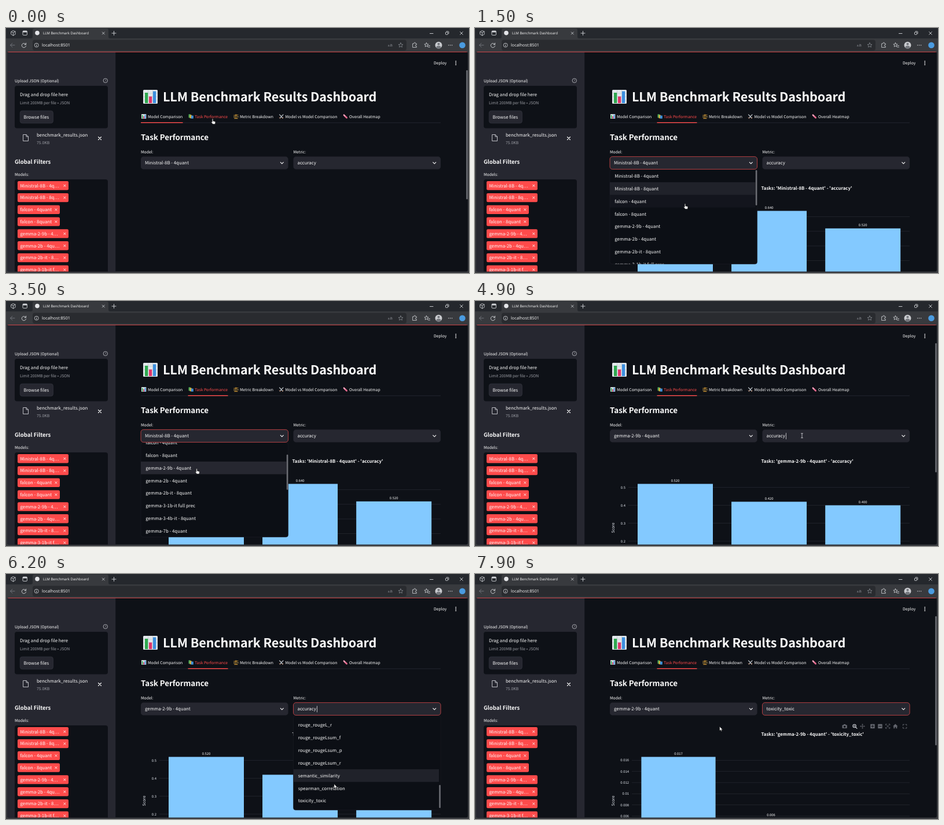
An HTML page for the animation above (8 s loop, 800x424 px).

```html
<!DOCTYPE html>
<html lang="en">
<head>
<meta charset="utf-8">
<title>LLM Benchmark Dashboard</title>
<style>
html, body { margin: 0; width: 100%; height: 100%; overflow: hidden; background: #25282d; }
svg { display: block; width: 100vw; height: 100vh; }
text { font-family: "Noto Sans CJK JP", "Noto Sans CJK SC", "Noto Sans CJK KR", "Noto Sans", sans-serif; white-space: pre; text-rendering: geometricPrecision; }
text.ui { font-family: "Open Sans", "Noto Sans", sans-serif; }
</style>
</head>
<body>
<svg id="stage" viewBox="0 0 800 424" xmlns="http://www.w3.org/2000/svg"></svg>
<script>
const LOOP = 8000, ZOOM = 0.547, ROW = 21.88, LIST_TOP = 245, LIST_H = 163.5;
const RED = '#ff4b4b', INK = '#fafafa', PANEL = '#262730', PAGE = '#0e1117', DIM = '#9a9ca3';

// --- markup helpers -------------------------------------------------------
const rect = (x, y, w, h, fill, r = 0, more = '') =>
  `<rect x="${x}" y="${y}" width="${w}" height="${h}" rx="${r}" fill="${fill}" ${more}/>`;
const line = (d, color = INK, w = 0.9, more = '') =>
  `<path d="${d}" fill="none" stroke="${color}" stroke-width="${w}" stroke-linecap="round" stroke-linejoin="round" ${more}/>`;
const shape = (d, fill, more = '') => `<path d="${d}" fill="${fill}" ${more}/>`;
const dot = (x, y, r, fill) => `<circle cx="${x}" cy="${y}" r="${r}" fill="${fill}"/>`;
const ring = (x, y, r, color, w) => `<circle cx="${x}" cy="${y}" r="${r}" fill="none" stroke="${color}" stroke-width="${w}"/>`;
const group = (id, body, more = '') => `<g id="${id}" ${more}>${body}</g>`;
const cross = (x, y, r, color = INK, w = 0.9) =>
  line(`M${x - r} ${y - r}L${x + r} ${y + r}M${x + r} ${y - r}L${x - r} ${y + r}`, color, w);
const clip = (id, x, y, w, h, r = 0) => `<clipPath id="${id}">${rect(x, y, w, h, '#000', r)}</clipPath>`;

// text centred on its cap height; px is the page size before zoom
const text = (x, cy, str, px = 16, fill = INK, more = '') =>
  `<text x="${x}" y="${(cy + px * ZOOM * 0.33).toFixed(2)}" font-size="${(px * ZOOM / 1.117).toFixed(2)}" fill="${fill}" ${more}>${str}</text>`;
const uiText = (x, y, str, size, fill = INK) =>
  `<text class="ui" x="${x}" y="${y}" font-size="${size}" fill="${fill}">${str}</text>`;
const BOLD = 'font-weight="700"';

// --- browser frame --------------------------------------------------------
function browser() {
  const soft = '#d4d6da', faint = '#85888e';
  return rect(0, 0, 800, 424, '#25282d') +
    rect(0, 18, 800, 406, '#383a3e') +
    shape('M43 18Q46 18 46 15V4Q46 1 49 1H174Q177 1 177 4V15Q177 18 180 18Z', '#383a3e') +
    line('M9 6.5L12 4.5L16 6V11L12.5 13L9 11ZM9 6.5L12.5 8.2L16 6M12.5 8.2V13', soft, 0.8) +
    rect(29, 5, 7.4, 7.4, 'none', 1.2, `stroke="${soft}" stroke-width=".9"`) +
    rect(29, 5, 7.4, 2.6, soft, 1) +
    dot(54, 8.6, 3.8, '#e4e5e8') +
    uiText(64, 11, 'LLM Benchmark Dashboard', 6.1) +
    cross(168.3, 9, 2, soft, 0.8) +
    line('M183 9H190M186.500 5.500V12.500', soft, 0.9) +
    line('M732.500 9.500H738', soft, 0.9) +
    rect(759.5, 7.3, 4, 4, 'none', 0.7, `stroke="${soft}" stroke-width=".9"`) +
    line('M761 5.800H764.200Q765 5.800 765 6.600V9.800', soft, 0.8) +
    cross(787, 9, 2.4, soft, 0.9) +
    line('M15 29.700H7.500M11 26.200L7.500 29.700L11 33.200', '#777a80', 0.9) +
    line('M34.300 28.500A3.700 3.700 0 1 0 34.600 31M34.600 26V28.700H31.900', soft, 0.9) +
    rect(46, 20.5, 646, 18.5, '#292b2f', 4) +
    ring(52.7, 29.7, 3.5, soft, 0.8) + line('M52.700 29.500V31.600M52.700 27.700V27.800', soft, 0.9) +
    uiText(62, 32.3, 'localhost:8501', 7.27) +
    `<text x="659.5" y="32" font-size="5.6" fill="${faint}">aあ</text>` +
    line(star(682, 29.8, 4.2), faint, 0.8) +
    line('M703 27H705Q705 25 706.300 25Q707.600 25 707.600 27H709.300V29Q707.300 29 707.300 30.300Q707.300 31.600 709.300 31.600V33.500H703Z', soft, 0.8) +
    line(star(726.5, 29.3, 3.8), soft, 0.8) + line('M730 30.500H732.500M729.500 33H732.500', soft, 0.8) +
    dot(747.5, 29.7, 6, '#c9cbcf') + dot(747.5, 27.8, 2, '#73767c') +
    shape('M743.300 33.700Q743.500 30.800 747.500 30.800Q751.500 30.800 751.700 33.700Q750 35.700 747.500 35.700Q745 35.700 743.300 33.700Z', '#73767c') +
    [764.8, 767.7, 770.6].map(x => dot(x, 29.7, 0.75, soft)).join('') +
    dot(788.5, 29.7, 5.3, '#4a9be0');
}

function star(cx, cy, r) {
  let d = '';
  for (let i = 0; i < 10; i++) {
    const a = -Math.PI / 2 + i * Math.PI / 5, q = i % 2 ? r * 0.46 : r;
    d += (i ? 'L' : 'M') + (cx + q * Math.cos(a)).toFixed(2) + ' ' + (cy + q * Math.sin(a)).toFixed(2);
  }
  return d + 'Z';
}

// --- sidebar --------------------------------------------------------------
function sidebar() {
  const tags = ['Ministral-8B - 4q…', 'Ministral-8B - 8q…', 'falcon - 4quant', 'falcon - 8quant',
    'gemma-2-9b - 4…', 'gemma-2b - 4qu…', 'gemma-2b-it - 8…', 'gemma-3-1b-it f…'];
  return rect(2, 41, 187.3, 383, PANEL) +
    text(15, 91, 'Upload JSON (Optional)', 14) +
    ring(171.8, 91, 3.7, '#c3c4c9', 0.8) + text(171.8, 91, '?', 10, '#d5d6da', 'text-anchor="middle"') +
    rect(15, 100, 161, 73.5, PAGE, 4) +
    text(24, 115.5, 'Drag and drop file here') +
    text(24, 129, 'Limit 200MB per file • JSON', 14, DIM) +
    rect(24.2, 143.2, 57.3, 21.6, PANEL, 4, 'stroke="#3d3f49" stroke-width=".5"') +
    text(30.5, 154, 'Browse files') +
    line('M30 184.500H35L38.500 188V195.500H30ZM35 184.500V188H38.500', '#d0d1d6', 0.9) +
    text(53, 185.5, 'benchmark_results.json') +
    text(53, 198, '75.0KB', 14, DIM) +
    cross(162, 191, 2.5, INK, 1.1) +
    text(15, 231.3, 'Global Filters', 19.5, INK, BOLD) +
    text(15, 253, 'Models:', 14) +
    rect(15, 262, 161, 180, PAGE, 4) +
    tags.map((s, i) => {
      const y = 272.8 + i * 20.8, w = s.startsWith('falcon') ? 73 : 88;
      return rect(20, y - 7.7, w, 15.3, RED, 2.2) + text(24.5, y, s) + cross(20 + w - 6.6, y, 1.6, INK, 0.9);
    }).join('');
}

// --- main area ------------------------------------------------------------
const chartIcon = (x, y, k) => `<g transform="translate(${x} ${y}) scale(${k})">` +
  rect(0, 0, 25, 24, '#e3e8ec', 1.5) +
  line('M1 6H24M1 12H24M1 18H24M8.500 1V23M16.500 1V23', '#b9c4cc', 0.7) +
  rect(3, 5, 5.2, 18, '#2fa84f') + rect(10, 11.5, 5.2, 11.5, '#e0356b') + rect(17, 2.5, 5.2, 20.5, '#3c8fe0') + '</g>';

function tabIcons() {
  return chartIcon(234, 149, 0.33) +
    rect(315.5, 149.3, 3.6, 6, '#4aa657', 0.5) + rect(317.6, 150.6, 3.4, 5.6, '#e2b23c', 0.5) +
    rect(319.8, 151.6, 4, 5.2, '#3d8fd8', 0.5) +
    line('M397.300 149.500V156M394.500 156.600H400.200M393.800 151.200L400.900 150.700', '#e0a43a', 1) +
    shape('M392.800 153.600H396.300Q394.500 156 392.800 153.600ZM398.700 153.200H402.200Q400.500 155.600 398.700 153.200Z', '#e8bb58') +
    line('M472.500 149.800L478.500 156M479 149.800L473 156', '#cfd6dc', 1.1) +
    line('M472.200 154.500L474.300 156.800M479.300 154.500L477.200 156.800', '#a4633e', 0.9) +
    line('M584 150.800L588.600 155.300', '#e7698e', 2.8) + line('M583.600 150.300L585.500 152.200', '#f3c0cf', 1.3);
}

function mainArea() {
  const tabs = [[245, 'Model Comparison'], [404, 'Metric Breakdown'], [482.5, 'Model vs Model Comparison'], [593, 'Overall Heatmap']];
  return text(739, 60.5, 'Deploy', 14) +
    [57.6, 60.5, 63.4].map(y => dot(777.3, y, 0.95, INK)).join('') +
    chartIcon(237, 107, 1) +
    text(271, 119, 'LLM Benchmark Results Dashboard', 44, INK, BOLD + ' letter-spacing="-.12"') +
    tabIcons() +
    tabs.map(([x, s]) => text(x, 153, s, 14)).join('') +
    text(326, 153, 'Task Performance', 14, RED, 'id="taskTab"') +
    rect(233, 163.6, 518, 0.7, '#2c2f38') +
    rect(233, 163, 72.5, 1.4, RED, 0, 'id="bar"') +
    text(233, 189.5, 'Task Performance', 27.4, INK, BOLD + ' letter-spacing="-.08"') +
    text(233, 214, 'Model:', 14) + text(496.5, 214, 'Metric:', 14);
}

const select = (id, x) => rect(x, 222.6, 254.6, 21.8, PANEL, 4.4, `id="${id}Box" stroke-width=".8"`) +
  text(x + 7, 233.5, '', 16, INK, `id="${id}Val"`) +
  line(`M${x + 241.3} 232.300L${x + 243.800} 234.800L${x + 246.300} 232.300`, INK, 1.1) +
  rect(0, 228.3, 0.7, 11, INK, 0, `id="${id}Caret"`);

// --- charts ---------------------------------------------------------------
function chart(id, c) {
  const yOf = v => 316.5 + (c.values[c.peak] - v) * c.k;
  let s = text(494.5, 277.5, `Tasks: '${c.model}' - '${c.metric}'`, 16, INK, BOLD);
  for (const v of c.ticks) {
    const y = yOf(v);
    s += rect(c.left, y - 0.3, 751 - c.left, 0.6, '#2b2e37') + text(c.left - 5, y, v, 12, '#e6eaf1', 'text-anchor="end"');
  }
  c.values.forEach((v, i) => {
    const x = c.x + i * c.step, y = yOf(v);
    s += rect(x, y, c.w, 500 - y, '#83c9ff') +
      text(x + c.w / 2, y - 6, v.toFixed(3), 12, INK, 'text-anchor="middle"');
  });
  s += `<g transform="translate(238.500 392.500) rotate(-90)">${text(0, 0, 'Score', 14, '#e6eaf1', 'text-anchor="middle"')}</g>`;
  return group(id, s);
}

const wide = { x: 281, step: 162.1, w: 130, left: 265, metric: 'accuracy', peak: 0 };
const charts = {
  chartA: { ...wide, model: 'Ministral-8B - 4quant', values: [0.44, 0.64, 0.52], peak: 1, k: 252.5, ticks: [0.6, 0.5, 0.4, 0.3] },
  chartB: { ...wide, model: 'gemma-2-9b - 4quant', values: [0.52, 0.42, 0.4], k: 309, ticks: [0.5, 0.4, 0.3, 0.2] },
  chartC: { ...wide, model: 'gemma-2-9b - 4quant', metric: 'toxicity_toxic', x: 287.4, step: 160, w: 128.2, left: 271,
    values: [0.0166, 0.0056, 0.001], k: 9670, ticks: [0.016, 0.014, 0.012, 0.01, 0.008, 0.006] }
};

function modebar() {
  const g = '#62656d';
  return rect(634.5, 261.3, 8.4, 5.8, g, 1) + rect(637, 260, 3.4, 2, g) + dot(638.7, 264.2, 1.7, PAGE) +
    ring(655.6, 263, 2.7, '#c9cbd1', 1.1) + line('M657.700 265.200L660 267.400', '#c9cbd1', 1.3) + line('M654.500 263H656.700M655.600 261.900V264.100', '#c9cbd1', 0.7) +
    line('M665.800 263.500H673.200M669.500 259.800V267.200M668.500 260.800L669.500 259.800L670.500 260.800M668.500 266.200L669.500 267.200L670.500 266.200M666.800 262.500L665.800 263.500L666.800 264.500M672.200 262.500L673.200 263.500L672.200 264.500', g, 0.8) +
    rect(683.2, 259.8, 7.5, 7.5, g, 0.8) + line('M685 263.500H689M687 261.500V265.500', PAGE, 1) +
    rect(696.2, 259.8, 7.5, 7.5, g, 0.8) + line('M698 263.500H702', PAGE, 1) +
    cross(713.2, 263.5, 2.3, g, 0.9) +
    line('M709.500 261.500V259.800H711.200M715.200 259.800H716.900V261.500M716.900 265.500V267.200H715.200M711.200 267.200H709.500V265.500', g, 0.9) +
    shape('M726.300 259.500L730.500 263.600H729.300V267.200H727.300V264.700H725.300V267.200H723.300V263.600H722.100Z', g) +
    line('M739.500 262V260.300H741.300M744 260.300H745.800V262M745.800 265.200V267H744M741.300 267H739.500V265.200', g, 1);
}

// --- option lists ---------------------------------------------------------
const models = ['Ministral-8B - 4quant', 'Ministral-8B - 8quant', 'falcon - 4quant', 'falcon - 8quant', 'gemma-2-9b - 4quant',
  'gemma-2b - 4quant', 'gemma-2b-it - 8quant', 'gemma-3-1b-it full prec', 'gemma-3-4b-it - 8quant', 'gemma-7b - 4quant'];
const rouge = ['1', '2', 'L', 'Lsum'].flatMap(n => ['f', 'p', 'r'].map(s => `rouge_rouge${n}_${s}`));
const metrics = ['accuracy', 'bertscore_f1', 'bertscore_precision', 'bertscore_recall', 'bleu', 'chrf', 'exact_match', 'f1_score',
  'mcc', 'mean_squared_error', 'meteor', 'pearson_correlation', 'perplexity', 'precision', 'recall', ...rouge,
  'semantic_similarity', 'spearman_correlation', 'toxicity_toxic'];

const list = (id, x, items, thumb) => group(id,
  rect(x, LIST_TOP, 254.6, LIST_H, '#0c0f15', 4, 'stroke="#1b1e25" stroke-width=".6"') +
  `<g clip-path="url(#${id}Clip)">` + group(id + 'Rows',
    rect(x, 0, 251.5, ROW, PANEL, 0, `id="${id}HovA"`) + rect(x, 0, 251.5, ROW, PANEL, 0, `id="${id}HovB"`) +
    items.map((s, i) => text(x + 8.3, 256 + i * ROW, s)).join('')) + '</g>' +
  rect(x + 251.8, 246, 2.6, thumb, '#6b6d73', 1.3, `id="${id}Thumb"`));

// --- assemble -------------------------------------------------------------
const stage = document.getElementById('stage');
stage.innerHTML = '<defs>' + clip('page', 2, 41, 796, 380.6, 3) +
  clip('modelsClip', 233, LIST_TOP, 254.6, LIST_H, 4) + clip('metricsClip', 496.5, LIST_TOP, 254.6, LIST_H, 4) + '</defs>' +
  browser() + '<g clip-path="url(#page)">' + rect(2, 41, 796, 383, PAGE) + sidebar() + mainArea() +
  Object.entries(charts).map(([id, c]) => chart(id, c)).join('') + group('modebar', modebar()) +
  list('models', 233, models, 61) + list('metrics', 496.5, metrics, 40) +
  select('model', 233) + select('metric', 496.5) +
  rect(795.2, 73, 2.6, 223.5, '#6b6d73', 1.3, 'id="pageThumb"') +
  rect(2, 40.9, 796, 1, '#e2494b') + '</g>' +
  group('cursor',
    group('hand', shape('M-.8.8Q-.8 0 0 0Q.8 0 .8.8V4L4 4.700Q5 5 4.900 5.900L4.400 9.300H.200L-2.400 6Q-2.600 5.100-1.800 5.200L-.8 6Z', '#fff', 'stroke="#111" stroke-width=".6"')) +
    group('arrow', shape('M0 0V7.300L1.700 5.800L2.800 8.300L4 7.800L2.900 5.400H5.200Z', '#fff', 'stroke="#111" stroke-width=".5"')) +
    group('beam', line('M-1.500-3.800H1.500M0-3.800V3.800M-1.500 3.800H1.500', '#d8d9dc', 0.8)));

const el = {};
stage.querySelectorAll('[id]').forEach(e => { el[e.id] = e; });
const set = (id, name, v) => el[id].setAttribute(name, v);
const show = (id, on) => set(id, 'visibility', on ? 'inherit' : 'hidden');
const label = (id, s) => { if (el[id].textContent !== s) el[id].textContent = s; };

// --- timing ---------------------------------------------------------------
const between = (t, a, b) => t >= a && t < b;
const ease = (t, a, b) => {
  const p = Math.min(1, Math.max(0, (t - a) / (b - a)));
  return p * p * (3 - 2 * p);
};
const latest = (t, steps) => steps.reduce((found, s) => t >= s[0] ? s : found);

// time, x, y of the pointer tip
const path = [[0, 357, 157], [150, 357, 157], [700, 372, 233], [1100, 372, 233], [1500, 363, 304], [1700, 358, 316], [2100, 351, 322],
  [2650, 351, 322], [3200, 329.5, 290], [3850, 329.5, 290], [4600, 565, 233], [5050, 565, 233], [5500, 567, 363.5],
  [6400, 567, 363.5], [6800, 556, 390], [7050, 556, 390], [7850, 422.7, 264], [8000, 422.7, 264]];
const pointers = [[0, 'hand'], [250, 'arrow'], [620, 'beam'], [1180, 'hand'], [3950, 'arrow'], [4450, 'beam'],
  [5120, 'hand'], [5450, 'arrow'], [6500, 'hand'], [7080, 'arrow']];
// time, row, strength, second row, strength
const modelHover = [[0, 0, 1, 0, 0], [1400, 1, 0.8, 2, 0.3], [1600, 2, 1, 0, 0], [1950, 3, 0.35, 6, 0.5],
  [2200, 6, 1, 0, 0], [2850, 5, 1, 0, 0], [3000, 4, 1, 0, 0]];
const metricHover = [[0, 0, 1, 0, 0], [5250, 2, 1, 0, 0], [5350, 4, 1, 0, 0], [5700, 16, 0.8, 0, 0], [5950, 27, 0.8, 0, 0],
  [6500, 28, 1, 0, 0], [6650, 29, 1, 0, 0]];

function pointerAt(t) {
  let i = 0;
  while (i < path.length - 2 && t >= path[i + 1][0]) i++;
  const [a, x, y] = path[i], [b, u, v] = path[i + 1], p = ease(t, a, b);
  return [x + (u - x) * p, y + (v - y) * p];
}

function drawList(id, open, scroll, ratio, hover) {
  show(id, open);
  if (!open) return;
  set(id + 'Rows', 'transform', `translate(0 ${-scroll})`);
  set(id + 'Thumb', 'y', 246 + scroll * ratio);
  [['HovA', 1], ['HovB', 3]].forEach(([part, k]) => {
    set(id + part, 'y', 256 + (hover[k] - 0.5) * ROW);
    set(id + part, 'opacity', hover[k + 1]);
  });
}

function draw(t) {
  const slide = ease(t, 120, 420);
  set('bar', 'x', 233 + 81.5 * slide);
  set('bar', 'width', 72.5 - 3.5 * slide);

  show('chartA', between(t, 400, 4200));
  show('chartB', between(t, 4200, 7250));
  show('chartC', t >= 7250);
  show('modebar', t >= 7450);
  set('modebar', 'opacity', ease(t, 7450, 7750));

  const modelOpen = between(t, 1100, 3800), metricOpen = between(t, 5000, 7000);
  drawList('models', modelOpen, 54.7 * ease(t, 1600, 2050), 0.36, latest(t, modelHover));
  drawList('metrics', metricOpen, (255.7 - 392.3 + 29 * ROW) * ease(t, 5350, 6050), 0.239, latest(t, metricHover));
  show('pageThumb', !modelOpen && !metricOpen);

  label('modelVal', t < 3800 ? models[0] : models[4]);
  label('metricVal', t < 7000 ? 'accuracy' : 'toxicity_toxic');
  set('modelBox', 'stroke', between(t, 1000, 4600) ? '#d8474a' : 'none');
  set('metricBox', 'stroke', t >= 5000 ? '#d8474a' : 'none');
  set('modelCaret', 'x', 317);
  set('metricCaret', 'x', 537);
  show('modelCaret', between(t, 1000, 3800) && Math.floor(t / 500) % 2 === 0);
  show('metricCaret', between(t, 4900, 7000) && Math.floor((t - 4900) / 500) % 2 === 0);

  const [x, y] = pointerAt(t), kind = latest(t, pointers)[1];
  set('cursor', 'transform', `translate(${x.toFixed(2)} ${y.toFixed(2)})`);
  for (const k of ['hand', 'arrow', 'beam']) show(k, k === kind);
}

const start = performance.now();
function tick() {
  draw((performance.now() - start) % LOOP);
  requestAnimationFrame(tick);
}
draw(0);
requestAnimationFrame(tick);
</script>
</body>
</html>
```
